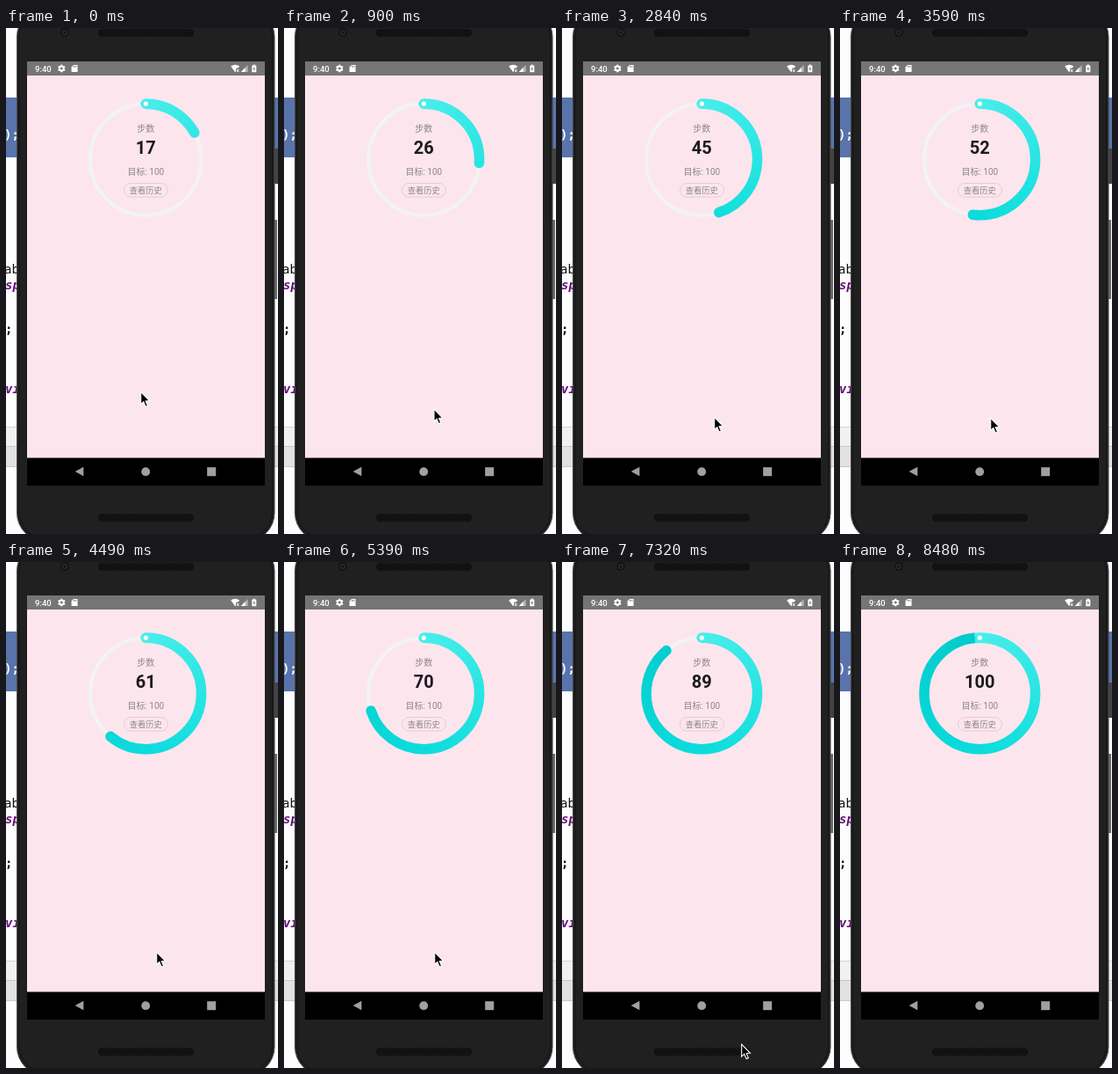
An HTML page with a canvas for the animation above (8580 ms loop, 310 px wide and 575 px high).

```html
<!DOCTYPE html>
<html lang="zh-CN">
<head>
<meta charset="utf-8">
<title>步数</title>
<style>
html, body { margin: 0; width: 100%; height: 100%; overflow: hidden; background: #fff; }
canvas { display: block; width: 310px; height: 575px; }
</style>
</head>
<body>
<canvas id="stage" width="310" height="575"></canvas>
<script>
const ctx = document.getElementById('stage').getContext('2d');
const LOOP = 8580;
const TAU = Math.PI * 2;
const SANS = 'Roboto, "Noto Sans CJK SC", "Noto Sans CJK", sans-serif';
const MONO = '"DejaVu Sans Mono", monospace';
const CX = 159.3, CY = 149.4, R = 63.3;

// The picture is refreshed in runs of 150 ms: [start, count]
const RUNS = [[0, 12], [1790, 30], [6280, 2], [6570, 11], [8350, 1], [8480, 1]];
// Pointer path: [time, x, y]
const PATH = [
  [0, 153.7, 413.6], [900, 171, 433], [1790, 174.7, 438.6], [2840, 173.7, 442.4],
  [3290, 171.7, 443.3], [5390, 171.7, 443.3], [6280, 193.7, 487.3],
  [6570, 193.7, 491.3], [7320, 204.7, 548], [7620, 232.5, 566]
];
const POINTER_END = 7770;

function tick(t) {
  const [start, count] = RUNS.filter(r => r[0] <= t).pop();
  return start + 150 * Math.min(count - 1, Math.floor((t - start) / 150));
}

function rect(x, y, w, h, fill) {
  ctx.fillStyle = fill;
  ctx.fillRect(x, y, w, h);
}

function pill(x, y, w, h, r) {
  ctx.beginPath();
  ctx.roundRect(x, y, w, h, r);
}

function disc(x, y, r, fill) {
  ctx.fillStyle = fill;
  ctx.beginPath();
  ctx.arc(x, y, r, 0, TAU);
  ctx.fill();
}

function poly(points, fill) {
  ctx.beginPath();
  points.forEach(([x, y]) => ctx.lineTo(x, y));
  ctx.closePath();
  ctx.fillStyle = fill;
  ctx.fill();
}

function text(str, x, y, font, fill, align = 'center') {
  ctx.font = font;
  ctx.fillStyle = fill;
  ctx.textAlign = align;
  ctx.fillText(str, x, y);
}

function editor() {
  rect(0, 0, 310, 575, '#fdfdfe');
  rect(0, 79, 310, 68, '#5974ab');
  rect(0, 453, 310, 22, '#f1f1f1');
  rect(0, 453, 310, 1, '#d4d4d4');
  rect(0, 475, 310, 24, '#e2e2e2');
  rect(0, 475, 310, 1, '#c8c8c8');
  rect(0, 498, 310, 1, '#c8c8c8');
  text(');', -2, 126, 'bold 14px ' + MONO, '#fff', 'left');
  text('ab', -2, 279, '14px ' + MONO, '#111', 'left');
  text('sp', -1, 297, 'italic bold 14px ' + MONO, '#660e7a', 'left');
  text(';', -1, 347, 'bold 14px ' + MONO, '#111', 'left');
  text('vi', -1, 415, 'italic bold 14px ' + MONO, '#660e7a', 'left');
}

function speaker(y) {
  ctx.save();
  pill(105, y, 109, 9, 4.5);
  ctx.fillStyle = '#0c0c0c';
  ctx.fill();
  ctx.clip();
  for (let j = 0; j < 4; j++)
    for (let x = 106 + j % 2; x < 213; x += 2) rect(x, y + 1 + j * 2, 1, 1, '#232323');
  ctx.restore();
  pill(105.5, y + .5, 108, 8, 4);
  ctx.strokeStyle = '#111';
  ctx.lineWidth = 1;
  ctx.stroke();
}

function phone() {
  rect(305, 137, 5, 40, '#434343');
  rect(305, 218, 4, 90, '#6b6b6b');
  pill(12.5, -22, 293.5, 605, 32);
  ctx.fillStyle = '#1e1e1e';
  ctx.fill();
  ctx.strokeStyle = '#4a4a4a';
  ctx.lineWidth = 1;
  ctx.stroke();
  pill(15, -20, 288.5, 600, 30);
  ctx.fillStyle = '#202020';
  ctx.fill();
  ctx.strokeStyle = '#141414';
  ctx.stroke();
  speaker(1);
  speaker(552);
  disc(67, 5, 5, '#141414');
  disc(67, 5, 3, '#2b2b2b');
  disc(67, 5, 1.5, '#111');
}

function gear(x, y) {
  ctx.save();
  ctx.translate(x, y);
  for (let i = 0; i < 6; i++) {
    rect(-1.1, -4.3, 2.2, 2.4, '#fff');
    ctx.rotate(TAU / 6);
  }
  ctx.restore();
  ctx.strokeStyle = '#fff';
  ctx.lineWidth = 1.9;
  ctx.beginPath();
  ctx.arc(x, y, 2.4, 0, TAU);
  ctx.stroke();
}

function statusBar() {
  rect(24, 38, 271, 16, '#757575');
  text('9:40', 33, 49.6, '500 9.5px ' + SANS, '#fff', 'left');
  gear(63.3, 46);
  poly([[77, 42], [81.6, 42], [81.6, 50], [74.6, 50], [74.6, 44.4]], '#fff');
  for (let i = 0; i < 3; i++) rect(76.7 + i * 1.5, 43, .8, 1.7, '#757575');
  ctx.beginPath();
  ctx.moveTo(261.2, 50.2);
  ctx.lineTo(256.2, 43.6);
  ctx.quadraticCurveTo(261.2, 40, 266.2, 43.6);
  ctx.closePath();
  ctx.fillStyle = '#fff';
  ctx.fill();
  rect(262.2, 45.6, 4.2, 4.8, '#757575');
  text('x', 264.4, 50, 'bold 6px ' + SANS, '#fff');
  poly([[275.6, 42], [275.6, 50], [267.8, 50]], '#b5b5b5');
  poly([[272.6, 45.1], [272.6, 50], [267.8, 50]], '#fff');
  rect(280.3, 42.6, 5, 7.6, '#fff');
  rect(281.7, 41.6, 2.2, 1.2, '#fff');
  poly([[283.2, 43.6], [281.4, 46.7], [282.6, 46.7], [282.4, 49.2], [284.2, 46], [283, 46]], '#757575');
}

function navBar() {
  rect(24, 488.5, 271, 31.5, '#000');
  poly([[78.7, 504], [88.4, 498.7], [88.4, 509.3]], '#a0a0a0');
  disc(159.2, 504.2, 4.9, '#a0a0a0');
  rect(229.2, 499.2, 10, 10, '#a0a0a0');
}

function ring(value) {
  ctx.lineWidth = 4.2;
  ctx.strokeStyle = '#f2f3f5';
  ctx.beginPath();
  ctx.arc(CX, CY, R, 0, TAU);
  ctx.stroke();

  const top = -Math.PI / 2;
  // The sweep starts slightly early so the first round cap stays light
  const sweep = ctx.createConicGradient(top - .09, CX, CY);
  sweep.addColorStop(0, '#4aeeeb');
  sweep.addColorStop(.5, '#0cdddc');
  sweep.addColorStop(1, '#00cbcb');
  ctx.lineWidth = 11.6;
  ctx.lineCap = 'round';
  ctx.strokeStyle = sweep;
  ctx.beginPath();
  ctx.arc(CX, CY, R, top, top + TAU * value / 100);
  ctx.stroke();
  ctx.lineCap = 'butt';
  disc(CX, CY - R, 2.6, '#fff');
}

function labels(value) {
  text('步数', CX, 118.4, '10px ' + SANS, '#8c858a');
  text(value, CX, 143.2, 'bold 20px ' + SANS, '#1c1a1c');
  text('目标: 100', CX, 167.2, '10px ' + SANS, '#8c858a');
  pill(134.5, 176.5, 50, 15.5, 7.75);
  ctx.strokeStyle = '#dccbd4';
  ctx.lineWidth = .9;
  ctx.stroke();
  text('查看历史', CX, 187.6, '9.3px ' + SANS, '#8c858a');
}

function pointer(t) {
  if (t >= POINTER_END) return;
  const i = PATH.findIndex(p => p[0] > t);
  let [, x, y] = PATH[PATH.length - 1];
  if (i > 0) {
    const a = PATH[i - 1], b = PATH[i];
    const k = (t - a[0]) / (b[0] - a[0]);
    x = a[1] + (b[1] - a[1]) * k;
    y = a[2] + (b[2] - a[2]) * k;
  }
  ctx.save();
  ctx.translate(x, y);
  poly([[0, 0], [0, 14], [3.1, 11.2], [5.4, 16.6], [7.8, 15.6], [5.5, 10.4], [9.8, 10]], '#000');
  ctx.strokeStyle = '#fff';
  ctx.lineWidth = 1.1;
  ctx.stroke();
  ctx.restore();
}

function draw(now) {
  const t = tick(now % LOOP);
  const value = Math.min(100, 17 + Math.floor(t / 101.7 + .3));
  editor();
  phone();
  rect(24, 54, 271, 435, '#fde5ee');
  statusBar();
  navBar();
  ring(value);
  labels(value);
  pointer(t);
}

let begin;
function loop(now) {
  begin ??= now;
  draw(now - begin);
  requestAnimationFrame(loop);
}
draw(0);
requestAnimationFrame(loop);
</script>
</body>
</html>
```
